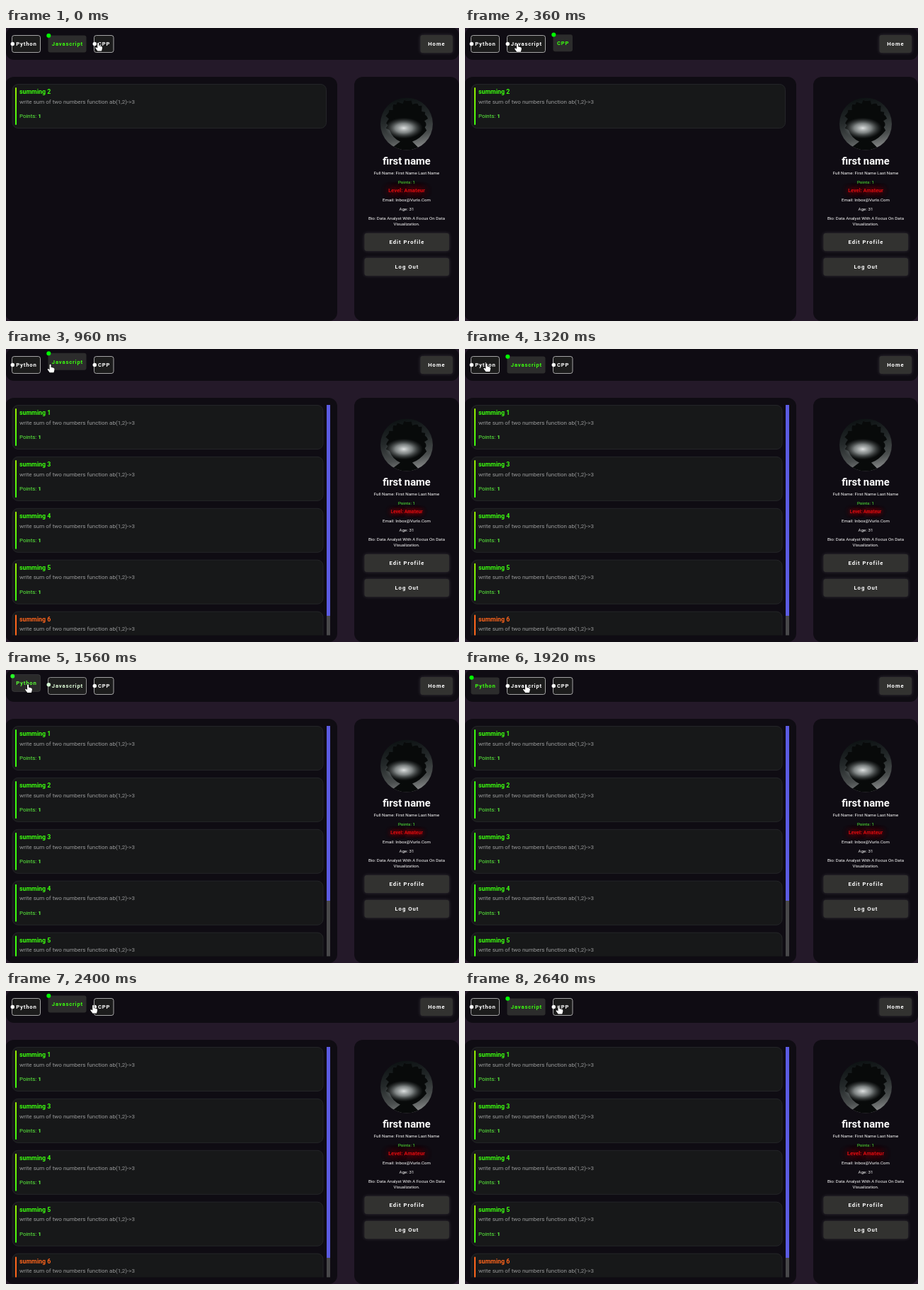
Animation, 640 px wide and 414 px high, one loop 2760 ms. Source, as an HTML page with a canvas:

```html
<!DOCTYPE html>
<html lang="en">
<head>
<meta charset="utf-8">
<title>Task list</title>
<style>
  html, body { margin: 0; width: 100%; height: 100%; overflow: hidden; background: #241929; }
  canvas { display: block; width: 640px; height: 414px; }
</style>
</head>
<body>
<canvas id="stage" width="640" height="414"></canvas>
<script>
const ctx = document.getElementById('stage').getContext('2d');
const LOOP = 2760, STEP = 120;
const FONT = 'Roboto, "Noto Sans", sans-serif';
const GREEN = '#3cff0f', LIME = '#9bf000', ORANGE = '#ff651c', PANEL = '#0f0c13', BUTTON = '#323230';

const LISTS = {
  python: { items: [1, 2, 3, 4, 5], thumbEnd: 326, barTop: GREEN },
  javascript: { items: [1, 3, 4, 5, 6], thumbEnd: 377, barTop: LIME },
  cpp: { items: [2], barTop: LIME }
};

// Tracks are [time, value] pairs, eased between neighbours.
const TABS = [
  { label: 'Python', x: 8.5, w: 40,
    active: [[1380, 0], [1620, 1], [2110, 1], [2330, 0]],
    lift: [[1320, 0], [1560, 4], [1800, 0]] },
  { label: 'Javascript', x: 59.5, w: 54,
    active: [[20, 1], [240, 0], [720, 0], [960, 1], [1380, 1], [1620, 0], [2110, 0], [2330, 1]],
    lift: [[600, 0], [900, 5], [1260, 0], [1920, 0], [2320, 5], [2600, 0]] },
  { label: 'CPP', x: 124.5, w: 27.5,
    active: [[20, 0], [240, 1], [720, 1], [960, 0]],
    lift: [[0, 0], [180, 5], [450, 0]] }
];
const CURSOR_X = [[0, 130.2], [120, 129], [360, 74], [840, 74], [1200, 30], [1560, 31],
  [1920, 86], [2160, 101], [2520, 131], [2640, 132.5], [2760, 130.2]];
const CURSOR_Y = [[120, 20.5], [360, 21.7], [840, 21.7], [1200, 20], [1920, 20], [2160, 18.5], [2640, 20.5]];

function track(keys, t) {
  if (t <= keys[0][0]) return keys[0][1];
  for (let i = 1; i < keys.length; i++) {
    const [t0, a] = keys[i - 1], [t1, b] = keys[i];
    if (t <= t1) {
      const p = (t - t0) / (t1 - t0);
      return a + (b - a) * p * p * (3 - 2 * p);
    }
  }
  return keys[keys.length - 1][1];
}

function mix(a, b, p) {
  return `rgb(${a.map((v, i) => Math.round(v + (b[i] - v) * p))})`;
}

function shade(gradient, ...stops) {
  stops.forEach(([at, color]) => gradient.addColorStop(at, color));
  return gradient;
}

function box(x, y, w, h, r, fill, stroke) {
  ctx.beginPath();
  ctx.roundRect(x, y, w, h, r);
  if (fill) { ctx.fillStyle = fill; ctx.fill(); }
  if (stroke) { ctx.strokeStyle = stroke; ctx.lineWidth = 1; ctx.stroke(); }
}

function dot(x, y, r, fill) {
  ctx.beginPath();
  ctx.arc(x, y, r, 0, Math.PI * 2);
  ctx.fillStyle = fill;
  ctx.fill();
}

function text(str, x, y, size, color, { weight = 400, spacing = 0, center = false } = {}) {
  ctx.font = `${weight} ${size}px ${FONT}`;
  ctx.letterSpacing = spacing + 'px';
  ctx.fillStyle = color;
  const width = ctx.measureText(str).width;
  ctx.fillText(str, center ? x - (width - spacing) / 2 : x, y);
  return width;
}

function glow(color, blur, draw) {
  ctx.save();
  ctx.shadowColor = color;
  ctx.shadowBlur = blur;
  draw();
  ctx.restore();
}

function button(label, x, y, w) {
  glow('rgba(255,255,255,.16)', 5, () => box(x, y, w, 25, 3, BUTTON));
  text(label, x + w / 2 - 0.3, y + 15.2, 7.7, '#fff', { weight: 700, spacing: 1, center: true });
}

function drawTab({ label, x, w, active, lift }, t) {
  const on = track(active, t), y = 10.5 - track(lift, t);
  const tint = mix([255, 255, 255], [60, 255, 15], on);
  box(x, y, w, 24, 3, mix([28, 28, 28], [44, 44, 44], on), `rgba(225,225,225,${0.7 * (1 - on)})`);
  text(label, x + w / 2, y + 14.7, 7.7, tint, { weight: 700, spacing: 0.8, center: true });
  dot(x + 0.8, y + 12 - 11.7 * on, 2.7 + 0.3 * on, mix([255, 255, 255], [0, 255, 0], on));
}

function drawCard(n, y, width, barTop) {
  const failed = n === 6, main = failed ? ORANGE : GREEN;
  box(9, y, width, 62, 8, '#171819', '#242528');
  box(13, y + 4.5, 2, 53, 1, shade(ctx.createLinearGradient(0, y + 4, 0, y + 58),
    [0, failed ? ORANGE : barTop], [1, main]));
  text('summing ' + n, 19, y + 13.6, 8.8, main, { weight: 700 });
  text('write sum of two numbers function ab(1,2)->3', 19, y + 27.2, 8.05, '#999a9b');
  const points = failed ? ORANGE : '#5cf53e';
  const labelWidth = text('Points: ', 19, y + 47.4, 7.9, points);
  text('1', 19 + labelWidth, y + 47.4, 7.9, points, { weight: 700 });
}

function drawList({ items, thumbEnd, barTop }) {
  ctx.save();
  ctx.beginPath();
  ctx.rect(0, 79, 468, 325.5);
  ctx.clip();
  items.forEach((n, i) => drawCard(n, 79.5 + 72.9 * i, thumbEnd ? 439 : 443.5, barTop));
  if (thumbEnd) {
    ctx.fillStyle = '#48484a';
    ctx.fillRect(453, 79, 5, 326);
    ctx.fillStyle = '#5b5be3';
    ctx.fillRect(453, 79, 5, thumbEnd - 79);
  }
  ctx.restore();
}

function drawAvatar() {
  ctx.save();
  ctx.translate(566, 135.5);
  ctx.beginPath();
  ctx.arc(0, 0, 37, 0, Math.PI * 2);
  ctx.clip();
  ctx.fillStyle = shade(ctx.createLinearGradient(-8, -37, 8, 37),
    [0, '#0d1213'], [0.4, '#24292a'], [0.75, '#4a4e4e'], [1, '#8b8d8d']);
  ctx.fillRect(-37, -37, 74, 74);

  // Plain silhouette: uneven hair, head and shoulders.
  ctx.fillStyle = '#080a0a';
  ctx.beginPath();
  for (let i = 0; i <= 36; i++) {
    const a = Math.PI * (0.86 + 1.28 * i / 36);
    const r = 28 + 2 * Math.sin(i * 2.3) + 1.5 * Math.sin(i * 1.1);
    ctx.lineTo(Math.cos(a) * r, Math.sin(a) * r - 4);
  }
  ctx.quadraticCurveTo(18, 22, 8, 25);
  ctx.lineTo(20, 37);
  ctx.lineTo(-25, 37);
  ctx.lineTo(-9, 25);
  ctx.quadraticCurveTo(-20, 20, -24, 9);
  ctx.fill();

  ctx.translate(-4, 6);
  ctx.scale(1, 0.55);
  ctx.fillStyle = shade(ctx.createRadialGradient(0, 0, 0, 0, 0, 27),
    [0, 'rgba(245,248,248,.9)'], [0.45, 'rgba(205,212,212,.6)'], [1, 'rgba(110,118,118,0)']);
  ctx.fillRect(-27, -27, 54, 54);
  ctx.restore();
}

function drawLevel(t) {
  const wave = Math.cos(2 * Math.PI * (t - 2600) / LOOP);
  ctx.save();
  ctx.translate(566, 232.3);
  ctx.scale(1 + 0.08 * wave, 1 + 0.08 * wave);
  const label = () => text('Level: Amateur', 0, 0, 6.8, '#c40c10', { weight: 500, spacing: 0.2, center: true });
  glow('rgba(255,0,0,.8)', 9 + 2 * wave, () => { label(); label(); });
  ctx.restore();
}

function drawProfile(t) {
  box(492, 69, 148, 345, 12, PANEL);
  drawAvatar();
  const line = (str, y, color = '#fff') =>
    text(str, 566, y, 6.2, color, { center: true });
  text('first name', 566, 192.5, 14.8, '#fff', { weight: 600, center: true });
  line('Full Name: First Name Last Name', 206.7);
  line('Points: 1', 219.8, '#55f53a');
  drawLevel(t);
  line('Email: Inbox@Vurlo.Com', 245.2);
  line('Age: 31', 258.2);
  line('Bio: Data Analyst With A Focus On Data', 270.8);
  line('Visualization.', 278.7);
  button('Edit Profile', 506.5, 290, 119.5);
  button('Log Out', 506.5, 325, 119.5);
}

function drawCursor(x, y) {
  ctx.save();
  ctx.translate(x, y);
  const hand = new Path2D('M-1 1Q0-.6 1 1V4.6L4.8 5.6Q6 6 5.9 8L4.8 12H-.8L-3.8 8Q-4 6.3-2.4 6.9L-1 8Z');
  ctx.lineWidth = 1.2;
  ctx.lineJoin = 'round';
  ctx.strokeStyle = '#111';
  ctx.stroke(hand);
  ctx.fillStyle = '#fff';
  ctx.fill(hand);
  ctx.restore();
}

function listAt(t) {
  if (t < 720) return LISTS.cpp;
  return t >= 1440 && t < 2160 ? LISTS.python : LISTS.javascript;
}

function draw(t) {
  ctx.fillStyle = '#241929';
  ctx.fillRect(0, 0, 640, 414);
  box(0, -1, 640, 46, 11, PANEL);
  box(-1, 69, 469, 345, 12, PANEL);
  TABS.forEach(tab => drawTab(tab, t));
  button('Home', 585.5, 10, 45.5);
  drawList(listAt(t));
  drawProfile(t);
  drawCursor(track(CURSOR_X, t), track(CURSOR_Y, t));
}

function tick() {
  const t = performance.now() % LOOP;
  draw(Math.floor(t / STEP) * STEP);
  requestAnimationFrame(tick);
}
tick();
</script>
</body>
</html>
```
